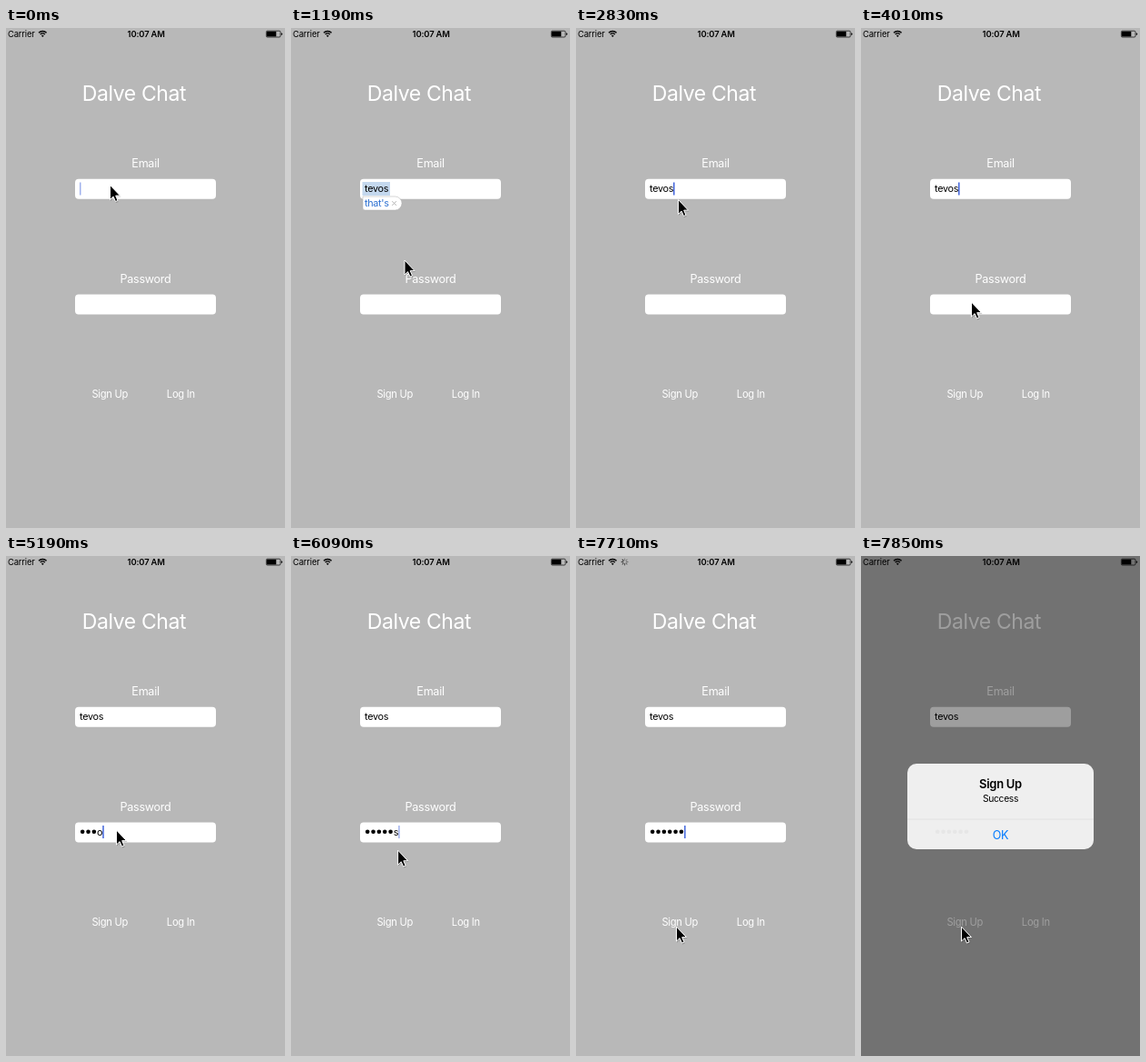
Write an HTML page that moves like this. It is 307 px wide and 549 px high and loops after 8000 ms.

```html
<!DOCTYPE html>
<html lang="en">
<head>
<meta charset="utf-8">
<title>Sign up</title>
<style>
  html, body { margin: 0; width: 100%; height: 100%; overflow: hidden; background: #b8b8b8; }
  svg { display: block; width: 307px; height: 549px; font-family: Inter, Roboto, sans-serif; }
  text { white-space: pre; letter-spacing: -.3px; }
  .label { font-size: 12.6px; }
  .button { font-size: 11.2px; }
  .input { font-size: 10.8px; }
  .status { font-size: 9.4px; letter-spacing: -.15px; }
  .mid { text-anchor: middle; }
</style>
</head>
<body>
<svg viewBox="0 0 307 549">
  <rect width="307" height="549" fill="#b8b8b8"/>

  <text class="status" x="2" y="10">Carrier</text>
  <g fill="none" stroke="#000" stroke-width="1.4">
    <path d="M36 5.3a6.2 6.2 0 0 1 8.6 0M37.7 7.1a3.8 3.8 0 0 1 5.2 0"/>
    <path d="M40.3 10l-1.4-1.5a2 2 0 0 1 2.8 0z" fill="#000" stroke="none"/>
  </g>
  <g id="spinner" stroke="#222" stroke-linecap="round"></g>
  <text class="status mid" x="154.2" y="10" font-weight="600">10:07 AM</text>
  <rect x="286.4" y="3.2" width="15.6" height="6.8" rx="1.2" fill="none" stroke="#000" stroke-width=".7"/>
  <rect x="287" y="3.8" width="10.3" height="5.6"/>
  <path d="M302.8 5.2q1.3.2 1.3 1.4t-1.3 1.4z"/>

  <g fill="#fff">
    <text class="mid" x="141" y="79.8" style="font-size:23px;letter-spacing:-.4px">Dalve Chat</text>
    <text class="label mid" x="153.5" y="153">Email</text>
    <text class="label mid" x="153.5" y="280">Password</text>
    <text class="button mid" x="114.2" y="406" id="signUp">Sign Up</text>
    <text class="button mid" x="192.3" y="406">Log In</text>
    <rect x="76" y="165.8" width="155" height="21.9" rx="4"/>
    <rect x="76" y="292.6" width="155" height="21.9" rx="4"/>
  </g>

  <rect id="selection" x="78.5" y="169" width="30.5" height="15" fill="#c4d8ee"/>
  <text class="input" id="email" x="81" y="180"></text>
  <g id="dots"></g>
  <text class="input" id="lastChar" y="307"></text>
  <rect id="caret" width="1.5" height="14" fill="#4265dc"/>

  <g id="suggestion">
    <path d="M79 185H114.5a7.5 7.5 0 0 1 0 15H81.5a2.5 2.5 0 0 1-2.5-2.5z" fill="#fff" stroke="#aaa" stroke-width=".5"/>
    <text class="input" x="81" y="196" fill="#2f72d2">that's</text>
    <path d="M111.3 190.2l4.6 4.6m0-4.6l-4.6 4.6" stroke="#b4b4b4"/>
  </g>

  <g id="alert">
    <rect width="307" height="549" opacity=".38"/>
    <rect x="51" y="228" width="205" height="94" rx="10" fill="#efefef"/>
    <path d="M51 289H256" stroke="#dedede" stroke-width=".8"/>
    <g id="ghostDots" fill="#e6e6e6"></g>
    <text class="mid" x="153.5" y="255.3" font-weight="600" style="font-size:13px">Sign Up</text>
    <text class="mid" x="153.5" y="270.4" style="font-size:10.3px">Success</text>
    <text class="label mid" x="153.5" y="310.7" fill="#007aff">OK</text>
  </g>

  <g id="pointer">
    <path d="M.5 1.5V17.5L4.2 14 6.6 19.5 9.2 18.4 6.8 13H12z" opacity=".22"/>
    <path d="M0 0V16L3.6 12.6 6 18 8.5 17 6.2 11.6H11z" stroke="#fff"/>
  </g>
</svg>
<script>
// The screen refreshes in steps; all times below are counted in them.
const LOOP = 8000, STEP = 148.1, DOT = 6.35, LEFT = 81;
const $ = id => document.getElementById(id);
const set = (id, attrs) => Object.entries(attrs).forEach(([name, value]) => $(id).setAttribute(name, value));
const show = (id, on) => set(id, { visibility: on ? 'visible' : 'hidden' });
const clamp = v => Math.max(0, Math.min(1, v));
const progress = (n, from, to) => clamp((n - from) / (to - from));
const smooth = p => p * p * (3 - 2 * p);
const repeat = (count, draw) => Array.from({ length: count }, (_, i) => draw(i)).join('');

const typed = (text, n, from, to, power) =>
  text.slice(0, Math.ceil(text.length * progress(n, from, to) ** power));

// Pointer glides: first step, last step, where it ends.
const glides = [
  [6, 8, 125, 255], [8, 10, 122, 277], [14, 15, 122, 302], [15, 18, 112.5, 188.5],
  [21, 24, 122, 312], [24, 27, 121.5, 301], [40, 43.7, 100, 424], [44, 47, 110.5, 407]
];

function pointerAt(n) {
  return glides.reduce(([x, y], [from, to, endX, endY]) => {
    const p = smooth(progress(n, from, to));
    return [x + (endX - x) * p, y + (endY - y) * p];
  }, [114.5, 172.5]);
}

// The caret stays lit after each activity, then fades out and in.
const activity = [-4, 1, 3, 18, 29, 33, 37];
function caretAlpha(n) {
  const age = n - activity.filter(a => a <= n).pop();
  return clamp(Math.abs(age % 7 - 5) / 2);
}

const dotRow = count => repeat(count, i => `<circle cx="${LEFT + DOT * (i + .5)}" cy="302.8" r="2.3"/>`);

const spokes = turn => repeat(8, i =>
  `<path d="M53.6 4.6V3" transform="rotate(${i * 45} 53.6 6.5)" opacity="${.35 + .65 * ((i + turn) % 8) / 7}"/>`);

function draw(n) {
  const suggesting = n >= 6 && n < 18;
  const inPassword = n >= 29;
  const password = typed('kivons', n, 30, 37, 2);
  const masked = n >= 42 ? password.length : Math.max(0, password.length - 1);
  const maskEnd = LEFT + masked * DOT;

  $('email').textContent = typed('tevos', n, 0, 4, 1);
  $('dots').innerHTML = dotRow(masked);
  $('lastChar').textContent = password.slice(masked);
  set('lastChar', { x: maskEnd });

  const caretX = inPassword
    ? maskEnd + $('lastChar').getComputedTextLength()
    : LEFT + $('email').getComputedTextLength();
  set('caret', { x: caretX, y: inPassword ? 296 : 169.5, opacity: suggesting ? 0 : caretAlpha(n) });

  show('selection', suggesting);
  show('suggestion', suggesting);
  set('signUp', { opacity: n < 48 ? 1 : clamp(.25 + (n - 48) * .4) });

  $('spinner').innerHTML = spokes(n * 6);
  show('spinner', n >= 50 && n < 53);
  show('alert', n >= 53);
  set('pointer', { transform: `translate(${pointerAt(n)})` });
}

$('ghostDots').innerHTML = dotRow(6);
const begin = performance.now();
(function tick() {
  draw(Math.floor((performance.now() - begin) % LOOP / STEP));
  requestAnimationFrame(tick);
})();
</script>
</body>
</html>
```
